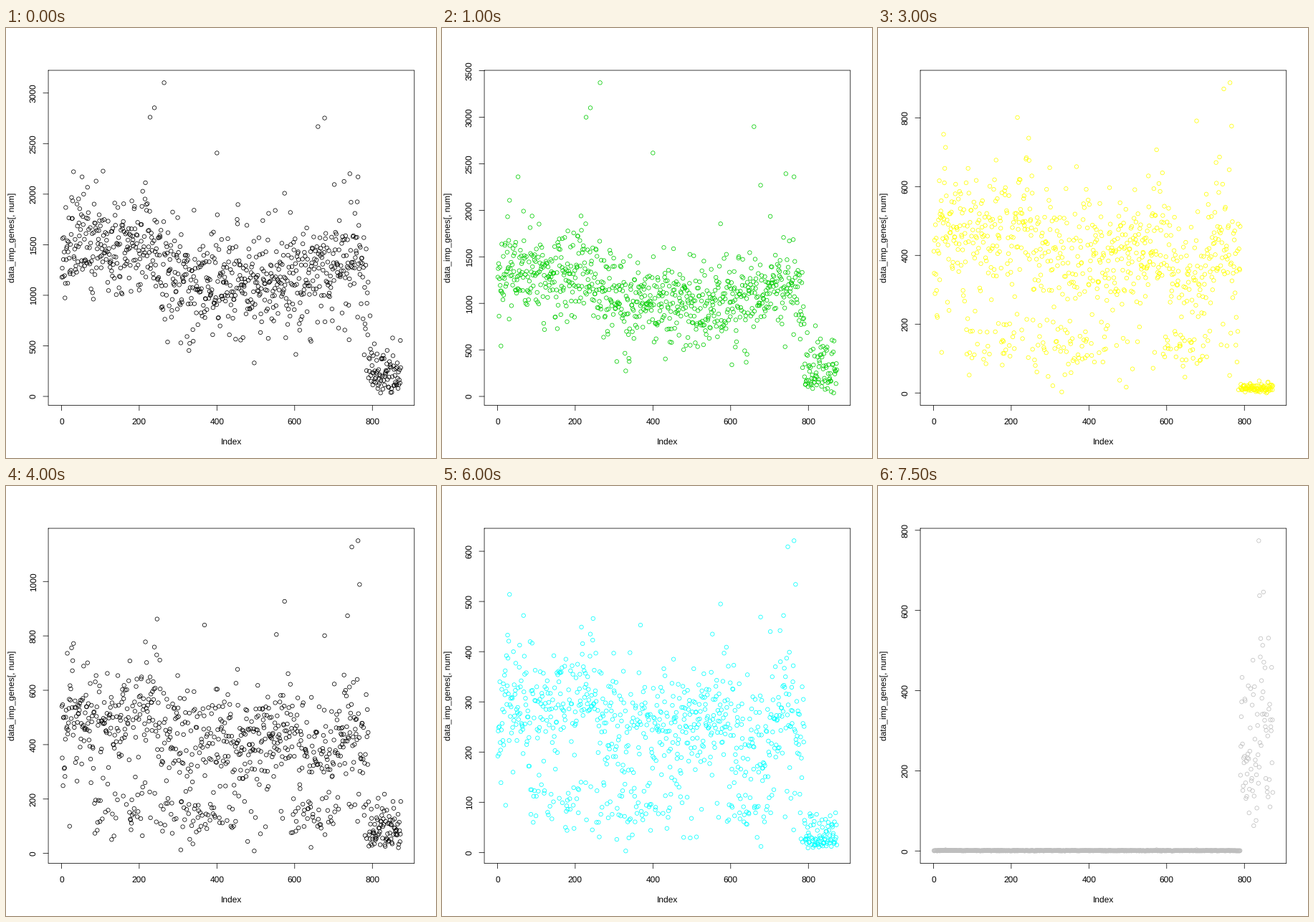
Write a matplotlib script that moves like this. It is 600 px wide and 600 px high and loops after 8 s.

```python
import math
import numpy as np
import matplotlib.pyplot as plt
from matplotlib.animation import FuncAnimation

SIZE, DPI = 600, 100
PX = 72 / DPI                     # points per pixel
ROW = 14.4                        # height of one margin line
LEFT, RIGHT = 4.1 * ROW, SIZE - 2.1 * ROW
TOP, BOTTOM = 4.1 * ROW, SIZE - 5.1 * ROW
TICK = ROW / 2
STROKE = .75 * PX
N, SPLIT = 873, 789               # samples, start of the last group
PALETTE = ["black", "red", "#00cd00", "blue", "cyan", "magenta", "yellow", "#bebebe"]

plt.rcParams.update({"font.family": ["Liberation Sans", "DejaVu Sans"],
                     "text.hinting": "none"})

# trend knots and spread relative to the slide's level, share of samples in the
# low cluster, and spikes as a fraction of the highest value
FAMILIES = {
    "early": dict(
        trend=[(0, 1.33), (60, 1.55), (150, 1.38), (220, 1.55), (290, 1.15), (400, 1.1),
               (520, 1.1), (600, 1.2), (700, 1.28), (770, 1.4), (789, .9)],
        spread=.23, low=0,
        spikes={53: .7, 228: .89, 239: .92, 264: 1, 400: .776, 660: .86, 742: .71, 763: .7}),
    "late": dict(
        trend=[(0, .9), (20, 1.2), (100, 1.15), (150, 1.1), (210, 1.28), (250, 1.2),
               (285, .92), (400, 1), (460, .88), (520, 1.05), (610, 1.15), (635, .8),
               (700, .85), (735, 1.2), (789, 1)],
        spread=.21, low=.25,
        spikes={246: .75, 368: .73, 553: .7, 736: .76, 747: .98, 763: 1, 767: .86}),
    "flat": dict(
        trend=[(0, 1.2), (55, 1.5), (90, 1), (789, .95)],
        spread=.45, low=0, spikes={837: 1}),
}

# family, level, mean of the last group, lowest and highest value
SLIDES = [("early", 1000, 240, 34, 3102), ("flat", 22, 920, 1, 1772),
          ("early", 900, 280, 37, 3371), ("early", 400, 110, 15, 1400),
          ("late", 400, 40, 5, 975), ("late", 400, 20, 0, 950),
          ("late", 400, 13, 0, 902), ("late", 400, 15, 0, 989),
          ("late", 420, 85, 9, 1150), ("late", 400, 80, 7, 1018),
          ("late", 400, 85, 9, 1080), ("late", 340, 60, 5, 850),
          ("late", 255, 34, 3, 621), ("late", 220, 30, 2, 540),
          ("late", 340, 60, 7, 900), ("flat", .9, 280, 0, 774)]

index = np.arange(1, N + 1)
shared = np.random.default_rng(11)
gene = shared.standard_t(6, size=N)
pick = shared.random(N)
sparse = (index < 85) | ((index > 445) & (index < 590)) | ((index > 720) & (index < 775))


def values(k):
    """Values of slide k; samples keep part of their offset between slides."""
    name, level, tail, lo, hi = SLIDES[k]
    fam = FAMILIES[name]
    rng = np.random.default_rng(100 + k)
    z = .8 * gene + .6 * rng.normal(size=N)
    y = np.interp(index, *zip(*fam["trend"])) + fam["spread"] * z
    in_low = pick < fam["low"] * np.where(sparse, .15, 1)
    y = level * np.where(in_low, .34 + .1 * z, y)
    y = np.where(index > SPLIT, rng.gamma(4, tail / 4, size=N), y)
    # fold strays back into the range
    y = lo + np.abs(y - lo)
    cap = .95 * hi
    y = cap - np.abs(cap - y)
    for i, part in fam["spikes"].items():
        y[i - 1] = part * hi
    y[np.argmin(y)] = lo
    return np.round(y)


def nice_step(span):
    cell = span / 5
    base = 10 ** math.floor(math.log10(cell))
    unit = base
    for factor, bias in ((2, .8), (5, 1.7), (10, .8)):
        if factor * base - cell < bias * (cell - unit):
            unit = factor * base
        else:
            break
    return unit


def scale(lo, hi, start, end):
    """Map lo..hi to start..end with a 4 % margin on both sides."""
    pad = (end - start) * .04 / 1.08
    return lambda v: start + pad + (v - lo) / (hi - lo) * (end - start - 2 * pad)


fig = plt.figure(figsize=(SIZE / DPI, SIZE / DPI), dpi=DPI)
ax = fig.add_axes([0, 0, 1, 1])
to_x = scale(1, N, LEFT, RIGHT)


def line(xs, ys):
    ax.plot(xs, ys, color="black", lw=STROKE, solid_capstyle="round", snap=False)


def label(x, y, text, turn=0):
    ax.text(x, y, text, size=12 * PX, ha="center", va="baseline",
            rotation=turn, rotation_mode="anchor")


def label_below(x, row, text):
    label(x, BOTTOM + (row + .8) * ROW, text)


def label_left(y, row, text):
    label(LEFT - (row + .2) * ROW, y, text, 90)


def draw(k):
    ax.clear()
    ax.set(xlim=(0, SIZE), ylim=(SIZE, 0))
    ax.axis("off")
    dark = k == 1
    fig.set_facecolor("#595959" if dark else "white")
    lo, hi = SLIDES[k][-2:]
    to_y = scale(lo, hi, BOTTOM, TOP)

    ax.scatter(to_x(index), to_y(values(k)), s=(5.4 * PX) ** 2, linewidths=STROKE,
               facecolors="none", edgecolors="#141414" if dark else PALETTE[k % 8],
               snap=False)

    line([LEFT, RIGHT, RIGHT, LEFT, LEFT], [TOP, TOP, BOTTOM, BOTTOM, TOP])
    for v in range(0, 801, 200):
        line([to_x(v)] * 2, [BOTTOM, BOTTOM + TICK])
        label_below(to_x(v), 1, str(v))
    step = nice_step((hi - lo) * 1.08)
    v = 0
    while to_y(v) >= TOP:
        line([LEFT - TICK, LEFT], [to_y(v)] * 2)
        label_left(to_y(v), 1, str(v))
        v += step
    label_below((LEFT + RIGHT) / 2, 3, "Index")
    label_left((TOP + BOTTOM) / 2, 3, "data_imp_genes[, num]")
    return []


anim = FuncAnimation(fig, draw, frames=len(SLIDES), init_func=lambda: [],
                     interval=500, repeat=True, repeat_delay=0)
plt.show()
```
